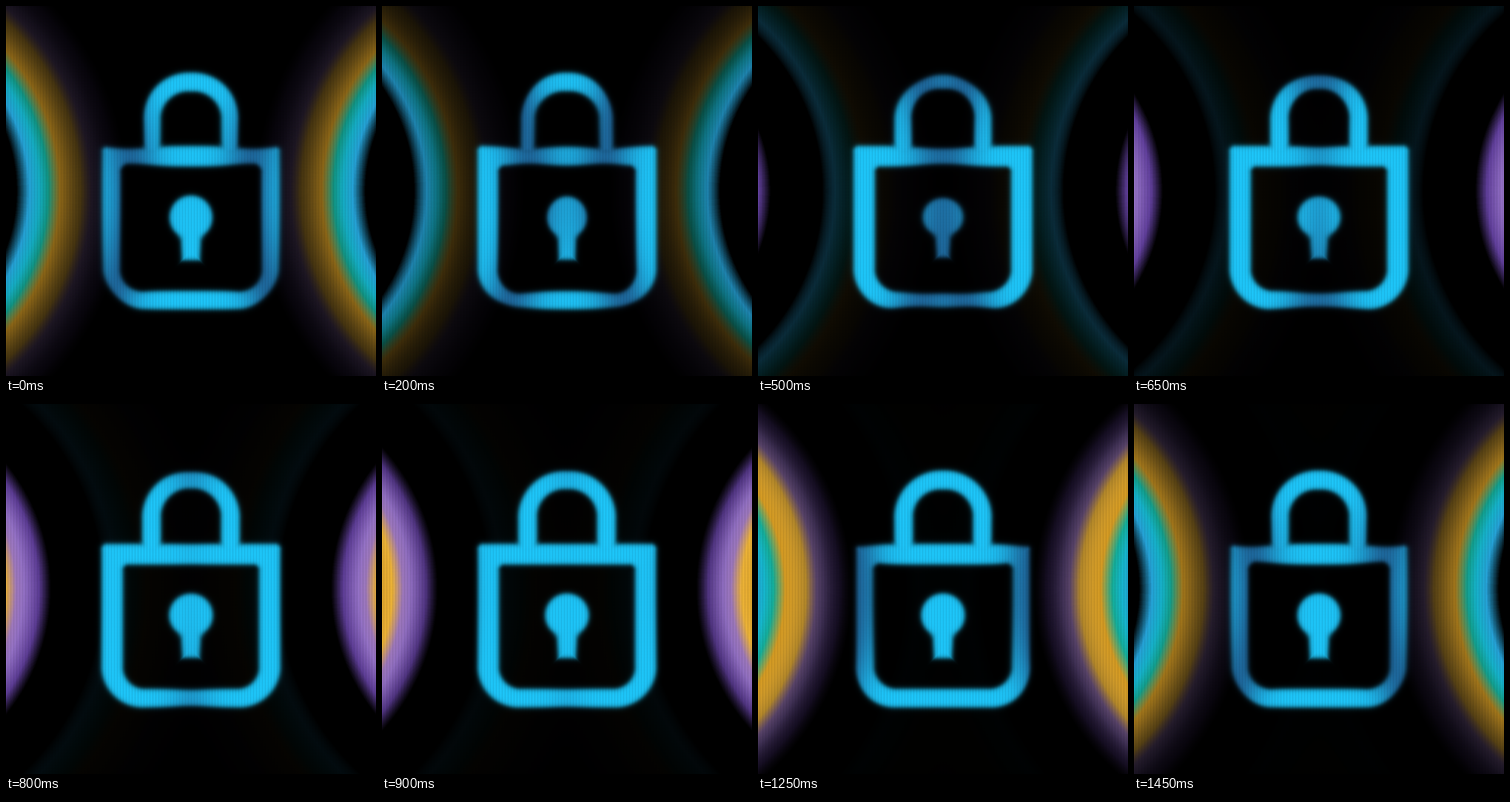
These frames come from a looping animation (500x500 px, 1.5 s). An HTML page with a canvas:

```html
<!DOCTYPE html>
<html lang="en">
<head>
<meta charset="utf-8">
<title>Lock</title>
<style>
html, body { margin: 0; width: 100%; height: 100%; overflow: hidden; background: #000; }
canvas { display: block; width: 500px; height: 500px; }
</style>
</head>
<body>
<canvas id="stage" width="500" height="500"></canvas>
<script>
const SIZE = 500, LOOP = 1500, STEP = 50;
const CENTER = 210;               // ring centres lie this far outside the left and right edges
const SPEED = 0.145, DELAY = 395; // wave front in px per ms, and when it enters
const BRIGHT = [30, 200, 252], DIM = [30, 105, 158];

// Ring colours by distance behind the wave front
const BANDS = [
  [-1, 0, 0, 0],
  [15, 98, 64, 158],
  [36, 150, 115, 200],
  [46, 160, 122, 190],
  [60, 238, 180, 56],
  [88, 220, 160, 36],
  [104, 20, 176, 156],
  [116, 22, 184, 208],
  [130, 38, 164, 218],
  [147, 0, 0, 0]
];

const ctx = document.getElementById("stage").getContext("2d");
const img = ctx.createImageData(SIZE, SIZE);
const reach = new Float32Array(SIZE * SIZE);
const shape = new Float32Array(SIZE * SIZE);
const grain = new Float32Array(SIZE * SIZE);

const mix = (a, b, k) => a + (b - a) * k;

function box(x, y, x0, y0, x1, y1, topR, botR) {
  const cy = (y0 + y1) / 2, r = y < cy ? topR : botR;
  const qx = Math.abs(x - (x0 + x1) / 2) - (x1 - x0) / 2 + r;
  const qy = Math.abs(y - cy) - (y1 - y0) / 2 + r;
  return Math.hypot(Math.max(qx, 0), Math.max(qy, 0)) + Math.min(Math.max(qx, qy), 0) - r;
}

// Union of two distances with a fillet of size k
function blend(a, b, k) {
  const h = Math.max(k - Math.abs(a - b), 0);
  return Math.min(a, b) - h * h / (4 * k);
}

// Signed distance to the padlock outline and keyhole
function lock(x, y) {
  const body = Math.max(
    box(x, y, 129, 189, 371, 410, 8, 56),
    -box(x, y, 158, 217, 342, 385, 8, 30));
  const shackle = Math.max(
    box(x, y, 184, 90, 316, 300, 64, 0),
    -box(x, y, 209.5, 115.5, 290.5, 300, 37, 0),
    y - 203);
  const stem = Math.max(
    Math.abs(x - 250) - 12 - (343 - y) * 0.06,
    y - 343.5, 290 - y);
  const hole = blend(Math.hypot(x - 250, y - 285.5) - 29.5, stem, 7);
  return Math.min(blend(body, shackle, 6), hole);
}

for (let y = 0, i = 0; y < SIZE; y++) {
  for (let x = 0; x < SIZE; x++, i++) {
    const px = x + 0.5, py = y + 0.5;
    const side = 250 - Math.hypot(px - 250, 20); // rounded where both sides meet
    reach[i] = Math.hypot(side + CENTER, py - 250) - CENTER;
    shape[i] = lock(px, py);
    grain[i] = 0.96 + 0.04 * Math.cos(x * Math.PI / 2) + (y % 2 ? 0.02 : -0.02);
  }
}

function band(u) {
  if (u <= BANDS[0][0]) return [0, 0, 0];
  for (let n = 1; n < BANDS.length; n++) {
    const a = BANDS[n - 1], b = BANDS[n];
    if (u < b[0]) {
      const k = (u - a[0]) / (b[0] - a[0]);
      return [1, 2, 3].map(c => mix(a[c], b[c], k));
    }
  }
  return [0, 0, 0];
}

// Ring colour and lock shade for every half pixel of reach
function profile(t) {
  const rows = [];
  for (let n = 0; n < 900; n++) {
    const d = n / 2, fade = 1 / (1 + (d / 82) ** 4.5);
    const row = [0, 0, 0, 0];
    for (const time of [t, t + LOOP]) {
      const u = SPEED * (time - DELAY) - d;
      band(u).forEach((v, c) => row[c] += v * fade);
      const z = (u + 8) / 24;
      row[3] = Math.max(row[3], Math.exp(-z * z / 2));
    }
    rows.push(row);
  }
  return rows;
}

function draw(t) {
  const rows = profile(t), out = img.data;
  for (let i = 0, o = 0; i < reach.length; i++, o += 4) {
    const row = rows[Math.min(899, Math.max(0, Math.round(reach[i] * 2)))];
    const shade = row[3];
    const sd = shape[i] + 4 * shade;
    const cover = sd > 16 ? 0 : 1 / (1 + Math.exp(sd / 1.8));
    for (let c = 0; c < 3; c++) {
      out[o + c] = mix(row[c], mix(BRIGHT[c], DIM[c], shade), cover) * grain[i];
    }
    out[o + 3] = 255;
  }
  ctx.putImageData(img, 0, 0);
}

const start = performance.now();
let shown = -1;
function tick() {
  const t = Math.max(0, performance.now() - start) % LOOP;
  const step = Math.floor(t / STEP);
  if (step !== shown) draw((shown = step) * STEP);
  requestAnimationFrame(tick);
}
tick();
</script>
</body>
</html>
```
